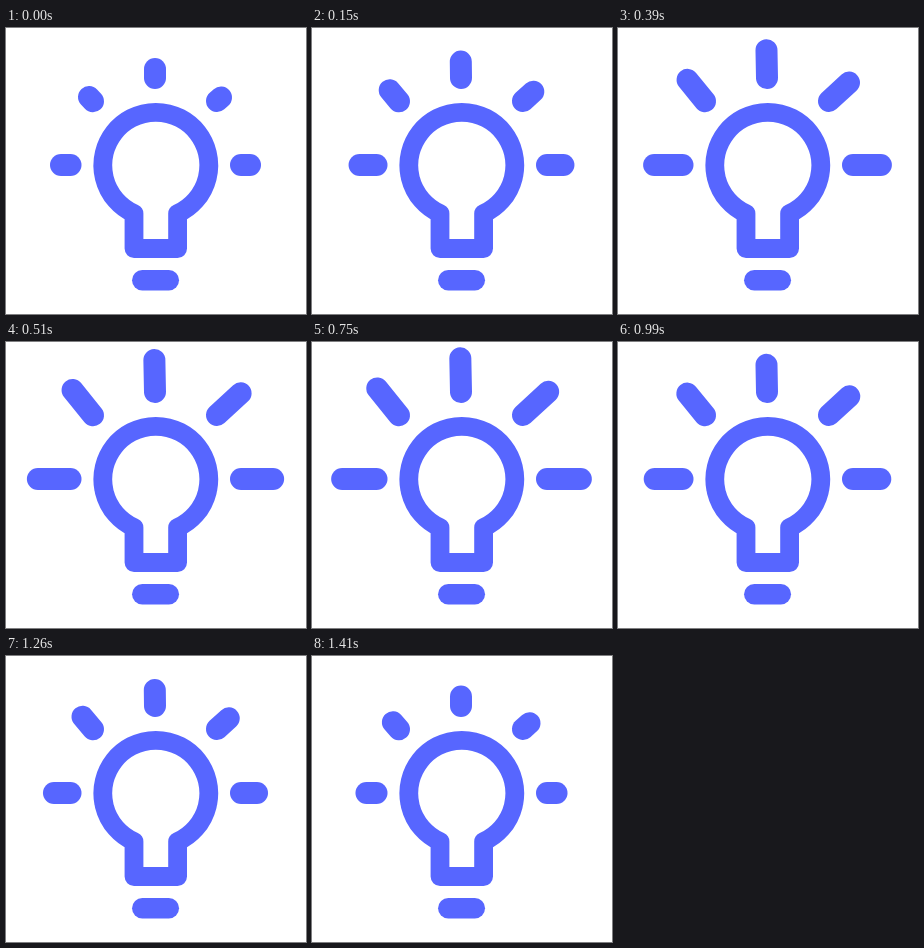
Recreate the animation shown at these times as an HTML page. Size 300 by 286 pixels, loop 1.5 s.

```html
<!DOCTYPE html>
<html lang="en">
<head>
<meta charset="utf-8">
<title>Light bulb</title>
<style>
  html, body { margin: 0; height: 100%; overflow: hidden; background: #fff; }
  svg { display: block; width: 100vw; height: 100vh; }
</style>
</head>
<body>
<svg viewBox="0 0 300 286" fill="none" stroke="#5766ff" stroke-linecap="round" stroke-linejoin="round">
  <path stroke-width="18.8" d="M128 220.5V185.6A53 53 0 1 1 171.6 185.6V220.5Z"/>
  <path stroke-width="20.5" d="M136.3 252.3H162.8"/>
  <g id="rays" stroke-width="22"></g>
</svg>
<script>
const LOOP = 1500, STEP = 30, LAST = 1410, PEAK = 660;

// Fixed inner point, short and long outer points, and the time the ray is short again
const rays = [
  { base: [64.5, 137], short: [55, 137], long: [29.4, 137], end: 1425 },
  { base: [87, 73.3], short: [83, 69], long: [64.8, 45.8], end: 1490 },
  { base: [149, 50], short: [149, 41], long: [148.3, 15.6], end: 1425 },
  { base: [211, 73], short: [215, 69.5], long: [236.7, 49.3], end: 1490 },
  { base: [235, 137], short: [244, 137], long: [269.6, 137], end: 1425 }
];

for (const ray of rays) {
  ray.path = document.createElementNS("http://www.w3.org/2000/svg", "path");
  document.getElementById("rays").append(ray.path);
}

const bezier = (s, a, b) => 3 * (1 - s) ** 2 * s * a + 3 * (1 - s) * s * s * b + s ** 3;

// Gentle start, nearly constant speed at the end
function easeIn(x) {
  if (x <= 0) return 0;
  if (x >= 1) return 1;
  let low = 0, high = 1;
  for (let i = 0; i < 24; i++) {
    const mid = (low + high) / 2;
    if (bezier(mid, 1 / 3, 5 / 6) < x) low = mid;
    else high = mid;
  }
  return bezier(low, 0, 5 / 6);
}

function draw(now) {
  const t = Math.min(Math.floor((now % LOOP) / STEP) * STEP, LAST);
  for (const { base, short, long, end, path } of rays) {
    const away = t < PEAK ? 1 - t / PEAK : (t - PEAK) / (end - PEAK);
    const reach = 1 - easeIn(away);
    const tip = short.map((v, i) => v + (long[i] - v) * reach);
    path.setAttribute("d", `M${base}L${tip}`);
  }
}

const start = performance.now();
function tick() {
  draw(performance.now() - start);
  requestAnimationFrame(tick);
}
tick();
</script>
</body>
</html>
```
